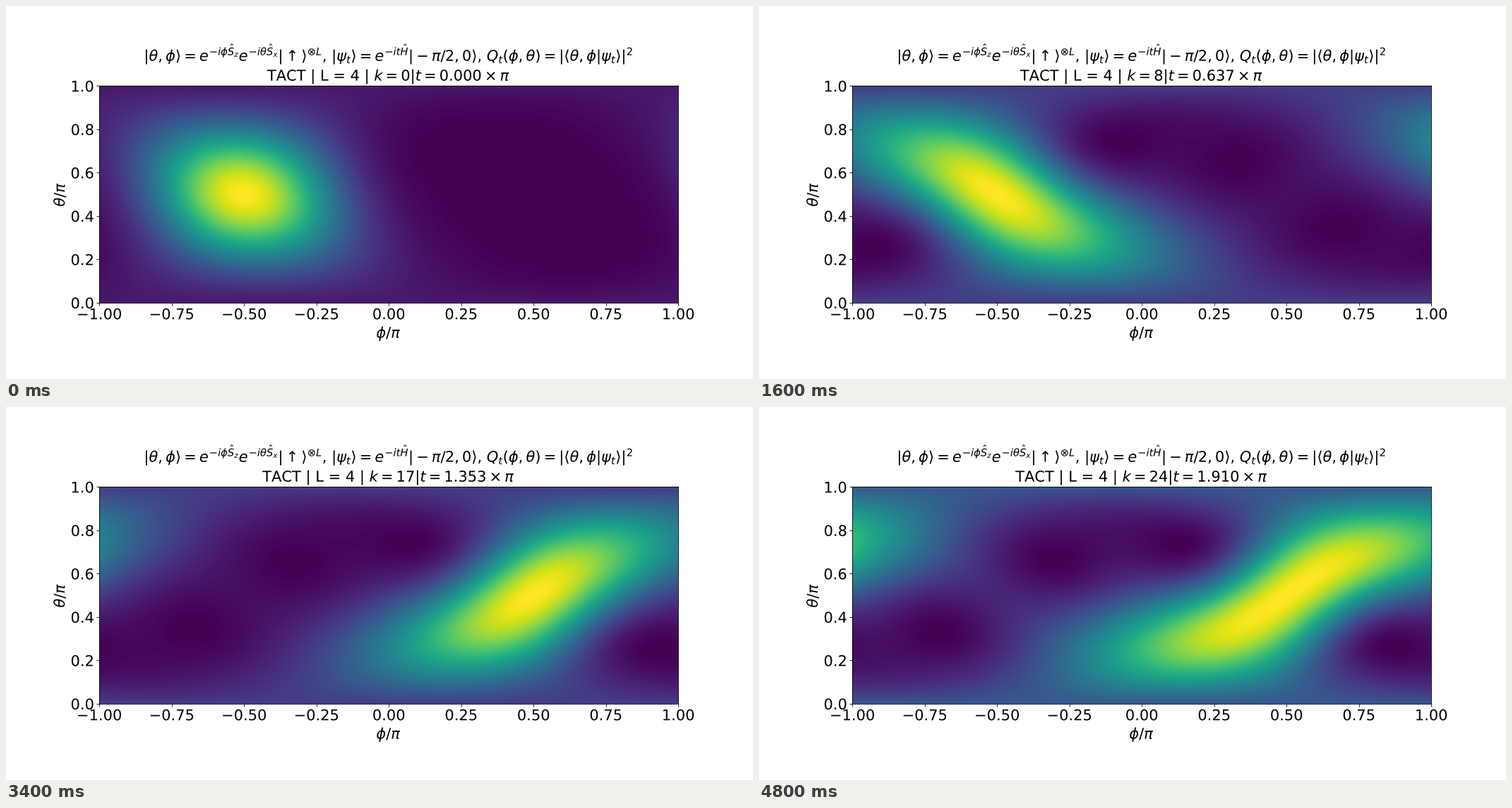
A matplotlib script that plays this animation: 1058 by 529 pixels, repeating every 5000 ms.

```python
import numpy as np
import matplotlib.pyplot as plt
from matplotlib.animation import FuncAnimation
from matplotlib.patheffects import Normal

W, H = 1058, 529
FRAMES, INTERVAL = 25, 200
STEP, START = 0.25, 0.05   # time between frames, time of the first state
OMEGA = np.sqrt(12)        # level splitting of the twisting Hamiltonian, spin 2

plt.rcParams.update({"font.family": "DejaVu Sans", "font.size": 20,
                     "axes.titlesize": 20, "axes.labelsize": 20})

FORMULA = (r"$|\theta,\phi\rangle=e^{-i\phi\hat{S}_z}e^{-i\theta\hat{S}_x}"
           r"|\uparrow\rangle^{\otimes L}$, "
           r"$|\psi_t\rangle=e^{-it\hat{H}}|-\pi/2,0\rangle$, "
           r"$Q_t(\phi,\theta)=|\langle\theta,\phi|\psi_t\rangle|^2$")


def centres(lo, hi, n):
    return lo + (hi - lo) * (np.arange(n) + 0.5) / n


phi, theta = np.meshgrid(np.pi * centres(-1, 1, 820), np.pi * centres(0, 1, 308))
x = np.sin(theta) * np.cos(phi)
y = np.sin(theta) * np.sin(phi)
z = np.cos(theta)

# Spin-coherent weights about the -y axis; azimuth counted from the x = z diagonal
near, far = (1 - y) / 2, (1 + y) / 2
twist = np.exp(2j * np.arctan2(x - z, x + z))


def husimi(t):
    """Q function of the state that cycles through m = 2, 0, -2."""
    p = OMEGA * t
    amp = (np.cos(p / 2) ** 2 * near ** 2 * twist
           + np.sqrt(3) * np.sin(p) * near * far
           + np.sin(p / 2) ** 2 * far ** 2 / twist)
    return np.abs(amp) ** 2


fig, ax = plt.subplots(figsize=(14, 7), dpi=W / 14)
image = ax.imshow(husimi(START), origin="lower", extent=(-1, 1, 0, 1),
                  aspect=0.75, cmap="viridis", interpolation="bilinear")
ax.set_xticks(np.linspace(-1, 1, 9))
ax.set_yticks(np.linspace(0, 1, 6))
ax.set_xlabel(r"$\phi/\pi$")
ax.set_ylabel(r"$\theta/\pi$")
title = ax.set_title("", linespacing=1.15)

# Draw text as outlines: no hinting, no rounding to whole pixels
for text in fig.findobj(plt.Text):
    text.set_path_effects([Normal()])


def update(k):
    t = STEP * k
    q = husimi(t + START)
    image.set_data(q)
    image.set_clim(q.min(), q.max())
    title.set_text(f"{FORMULA}\nTACT | L = 4 | $k={k}|t={t / np.pi:.3f}\\times\\pi$")
    return image, title


anim = FuncAnimation(fig, update, frames=FRAMES, interval=INTERVAL,
                     init_func=lambda: update(0), repeat=True)
plt.show()
```
